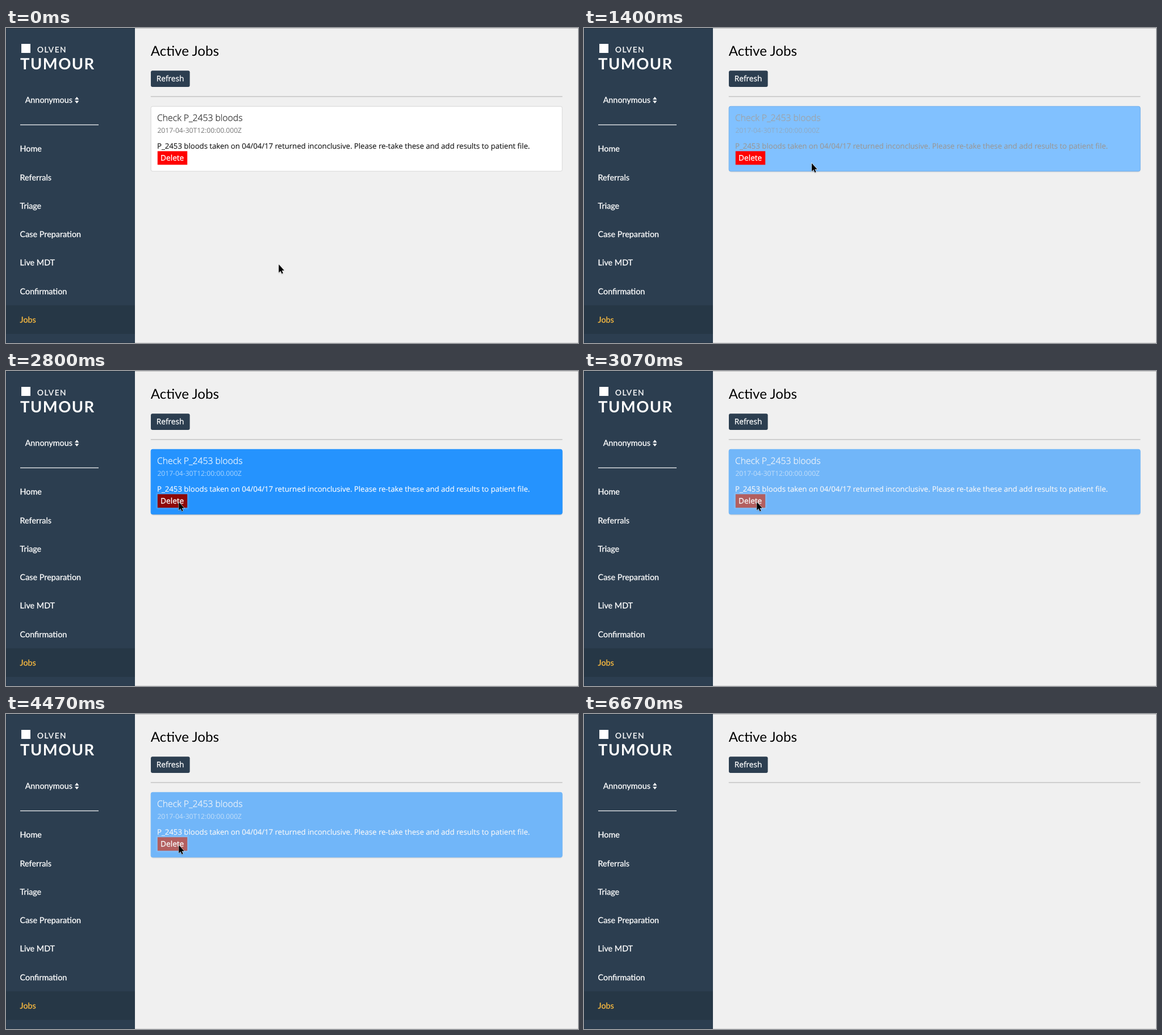
Recreate the animation shown at these times as an HTML page. Size 1007 by 556 pixels, loop 6740 ms.

```html
<!DOCTYPE html>
<html lang="en">
<head>
<meta charset="utf-8">
<title>Active Jobs</title>
<style>
html, body { margin: 0; width: 100%; height: 100%; overflow: hidden; background: #f0f0f0; }
svg { display: block; width: 1007px; height: 556px; text-rendering: geometricPrecision; }
.lato { font-family: Lato, sans-serif; }
.open { font-family: "Open Sans", "Noto Sans", sans-serif; }
.nav { font-size: 14.35px; fill: #fff; stroke: #fff; stroke-width: .3; }
.nav .on { fill: #fcbc40; stroke: #fcbc40; }
.btn { font-size: 13.65px; fill: #fff; stroke: #fff; stroke-width: .3; }
</style>
</head>
<body>
<svg viewBox="0 0 1007 556">
  <defs>
    <filter id="soft" x="-5%" y="-10%" width="110%" height="125%"><feGaussianBlur stdDeviation="1.3"/></filter>
    <filter id="glow" x="-20%" y="-40%" width="140%" height="180%"><feGaussianBlur stdDeviation="1"/></filter>
    <filter id="drop" x="-50%" y="-50%" width="200%" height="200%"><feGaussianBlur stdDeviation="1"/></filter>
  </defs>
  <rect width="1007" height="556" fill="#f0f0f0"/>

  <rect width="227" height="556" fill="#2c3e50"/>
  <rect y="489.5" width="227" height="50.5" fill="#263746"/>
  <rect x="27" y="28" width="16" height="16" fill="#fff"/>
  <g class="lato" fill="#fff">
    <text x="55" y="43" font-size="13.6" letter-spacing="1.6" stroke="#fff" stroke-width=".3">OLVEN</text>
    <text x="25" y="73" font-size="27.4" font-weight="700" letter-spacing="1.5">TUMOUR</text>
  </g>
  <g class="lato nav" id="nav"><text x="33.7" y="132">Annonymous</text></g>
  <path d="M121 126.2l3.7-4.7 3.7 4.7zM121 128.4l3.7 4.7 3.7-4.7z" fill="#fff"/>
  <rect x="25" y="170.3" width="138" height="1.2" fill="#fff"/>

  <text class="lato" x="254.7" y="49" font-size="24.15" fill="#000">Active Jobs</text>
  <rect x="255" y="75.2" width="68.6" height="28.8" rx="3" fill="#2c3e50"/>
  <text class="open btn" x="264.8" y="94">Refresh</text>
  <rect x="254.8" y="120.4" width="724.7" height="1.2" fill="#b9b9b9"/>

  <g id="card">
    <rect id="shade" x="256" y="140" width="722.6" height="113.5" rx="3" fill="#000" fill-opacity=".4" filter="url(#soft)"/>
    <rect id="face" x="255.2" y="138.3" width="724" height="114.5" rx="3"/>
    <g class="open">
      <text id="head" x="266" y="164" font-size="15.72" font-weight="300" stroke-width=".25">Check P_2453 bloods</text>
      <text id="date" x="266.4" y="185" font-size="12.1">2017-04-30T12:00:00.000Z</text>
      <text id="note" x="266" y="213" font-size="13.17" stroke-width=".15">P_2453 bloods taken on 04/04/17 returned inconclusive. Please re-take these and add results to patient file.</text>
      <rect id="ring" x="266" y="216.6" width="54" height="25.5" rx="1" fill="none" stroke="#5cb0ff" stroke-width="2.5" filter="url(#glow)"/>
      <rect id="del" x="266.8" y="217.4" width="52.4" height="24"/>
      <text class="btn" x="272.1" y="234">Delete</text>
    </g>
  </g>

  <path d="M0 .5H1007" stroke="#000" stroke-opacity=".2"/>
  <path d="M0 555.5H1007M.5 0V556" stroke="#000" stroke-opacity=".1"/>

  <g id="cursor">
    <path d="M0 1V17L3.7 13.6 6 19 8.4 18 6.2 12.6H11Z" fill-opacity=".35" filter="url(#drop)"/>
    <path d="M.3 .3V15.6L3.7 12.4 6 17.7 8.2 16.8 6 11.6H10.4Z" fill="#000" stroke="#fff" stroke-width="1.1" paint-order="stroke"/>
  </g>
</svg>
<script>
const LOOP = 6740, STEP = LOOP / 101;
const byId = id => document.getElementById(id);
const [nav, card, shade, face, head, date, note, ring, del, cursor] =
  ["nav", "card", "shade", "face", "head", "date", "note", "ring", "del", "cursor"].map(byId);

["Home", "Referrals", "Triage", "Case Preparation", "Live MDT", "Confirmation", "Jobs"].forEach((label, i, all) => {
  const el = document.createElementNS("http://www.w3.org/2000/svg", "text");
  el.textContent = label;
  el.setAttribute("x", 24.6);
  el.setAttribute("y", 218.3 + i * 50.25);
  if (i === all.length - 1) el.setAttribute("class", "on");
  nav.append(el);
});

// time, x, y
const track = [[600, 480, 417], [1334, 402, 249], [1468, 398, 234], [2050, 304, 231]];
const ramp = (t, a, b) => Math.min(1, Math.max(0, (t - a) / (b - a)));
const mix = (a, b, k) => `rgb(${a.map((v, i) => Math.round(v + (b[i] - v) * k))})`;
const show = (el, on) => el.setAttribute("visibility", on ? "visible" : "hidden");

function ink(el, color) {
  el.setAttribute("fill", color);
  el.setAttribute("stroke", color);
}

function slope(i, axis) {
  const a = track[i - 1], b = track[i + 1];
  return a && b ? (b[axis] - a[axis]) / (b[0] - a[0]) : 0;
}

function along(t, axis) {
  const last = track.length - 1;
  if (t <= track[0][0]) return track[0][axis];
  if (t >= track[last][0]) return track[last][axis];
  const i = track.findIndex(p => p[0] > t) - 1;
  const a = track[i], b = track[i + 1], d = b[0] - a[0], u = (t - a[0]) / d, v = 1 - u;
  return v * v * (1 + 2 * u) * a[axis] + u * u * (3 - 2 * u) * b[axis]
    + u * v * d * (v * slope(i, axis) - u * slope(i + 1, axis));
}

function draw(t) {
  const x = along(t, 1), y = along(t, 2);
  const hover = ramp(t, 1340, 1450);
  const white = [255, 255, 255], blue = [30, 144, 255];

  cursor.setAttribute("transform", `translate(${x} ${y}) scale(.94)`);
  show(cursor, t < 6400);

  show(card, t < 4800);
  card.setAttribute("opacity", 1 - .4 * ramp(t, 2790, 2930));
  shade.setAttribute("opacity", hover);
  face.setAttribute("fill", mix(white, blue, hover));
  face.setAttribute("stroke", mix([216, 216, 216], blue, hover));
  ink(head, mix([40, 40, 40], white, hover));
  date.setAttribute("fill", mix([118, 118, 118], [165, 211, 255], hover));
  ink(note, mix([25, 25, 25], white, hover));
  del.setAttribute("fill", x < 319 ? "#8b0000" : "#f00");
  ring.setAttribute("opacity", t > 2720 ? .7 : 0);
}

function frame(now) {
  const t = now % LOOP;
  draw(Math.floor(t / STEP + .1) % 101 * STEP);
  requestAnimationFrame(frame);
}
draw(0);
requestAnimationFrame(frame);
</script>
</body>
</html>
```
